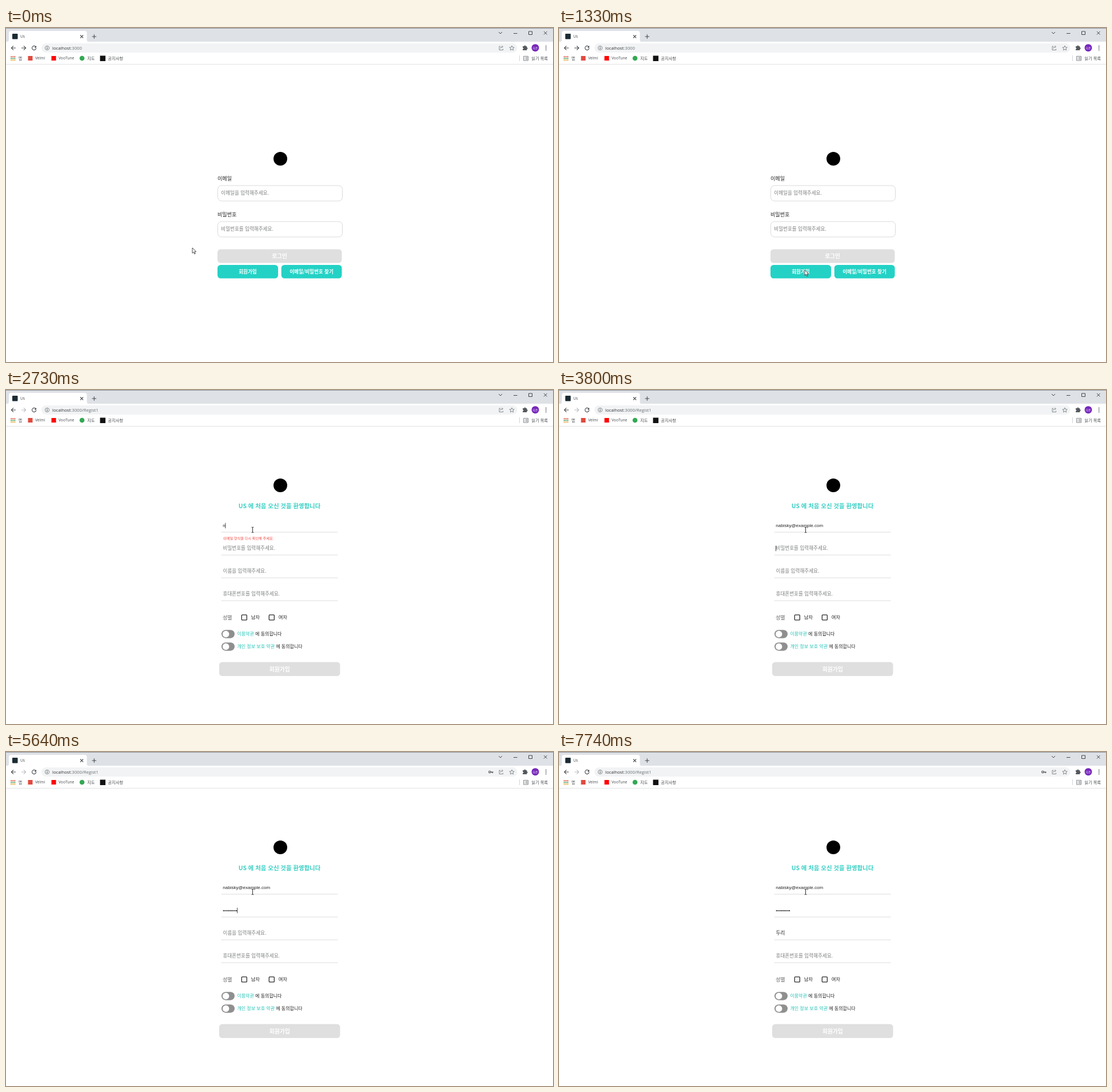
Animation of 957x585 px, one loop 8 s. Source, as an HTML page:

```html
<!DOCTYPE html>
<html lang="ko">
<head>
<meta charset="utf-8">
<title>Us</title>
<style>
  html, body { margin: 0; width: 100%; height: 100%; overflow: hidden; background: #fff; }
  svg { display: block; width: 100vw; height: 100vh; }
  text { font-family: "Noto Sans CJK KR", "Noto Sans CJK", "Noto Sans KR", sans-serif; font-size: 8.57px; fill: #222; white-space: pre; }
  .bar text { font-size: 7.25px; fill: #45494d; }
  .bar .en { font-family: "Open Sans", sans-serif; font-size: 6.7px; }
  .bar .url { font-family: "Open Sans", sans-serif; font-size: 7.7px; fill: #6b7075; }
  .bar .me { font-size: 4.8px; fill: #fff; text-anchor: middle; }
  .line { fill: none; stroke: #45494d; stroke-width: 1.1; }
  .thin { fill: none; stroke: #303336; stroke-width: .9; }
  .soft { fill: none; stroke: #6b7075; stroke-width: .8; }
  .hint { fill: #7b7f7d; }
  .latin { font-family: "Liberation Sans", Arial, sans-serif; font-size: 8px; }
  .label { font-size: 9.1px; }
  .btn { font-weight: 700; fill: #fff; text-anchor: middle; }
  .box { fill: #fff; stroke: #dadada; }
  .off { fill: #dfdfdf; }
  .teal { fill: #23d2c5; }
  .rule { stroke: #dcdcdc; }
  .check { fill: #fff; stroke: #2a2a2a; stroke-width: 1.3; }
  .terms { font-size: 8px; }
  .terms tspan { fill: #27c4b8; }
  .warn { font-size: 6.2px; fill: #f0433a; }
</style>
</head>
<body>
<svg viewBox="0 0 957 585" preserveAspectRatio="none">
  <g class="bar">
    <rect width="957" height="24" fill="#dee1e6"/>
    <rect width="957" height=".8" fill="#7d848e"/>
    <path d="M1 24.500q4 0 4-4V9q0-4 4-4H137.500q4 0 4 4v11.500q0 4 4 4z" fill="#fff"/>
    <rect x="11" y="10" width="9.500" height="9.500" rx="1" fill="#1b2b33"/>
    <text class="en" x="25" y="17.300">Us</text>
    <path class="line" d="M130 12.500l5 5m0-5l-5 5M150.500 15h7.500M154.250 11.250v7.500"/>
    <path class="thin" d="M862 7l3 3 3-3M888 9.500h6.500M914.500 6h6v5.500h-6zM941 6l5.500 5.500m0-5.500l-5.500 5.500"/>

    <rect x="62" y="27" width="832.500" height="16" rx="8" fill="#f1f3f4"/>
    <path class="line" d="M17 35H9.500M13 31.300L9.300 35l3.700 3.700"/>
    <path class="line" id="fwd" d="M27 35h7.500M31 31.300l3.700 3.700-3.700 3.700"/>
    <path class="line" d="M52 32.800a3.600 3.600 0 1 0 .7 2.600"/>
    <path d="M53 31v3.400h-3.400z" fill="#45494d"/>
    <circle class="soft" cx="72" cy="35" r="3.600"/>
    <path class="line" d="M72 34.500v2.600M72 32.800v.9"/>
    <text class="url" x="81" y="37.700"><tspan fill="#303336">localhost</tspan>:3000<tspan id="path"></tspan></text>
    <g id="key"><circle class="line" cx="846.300" cy="35" r="1.700"/><path class="line" d="M848 35h4.500M851.500 35v1.900M849.800 35v1.500"/></g>
    <path class="soft" d="M865 32h-2v6.500h6.500v-2M865 36q0-3.300 3.500-3.300M867.500 31l2 1.800-2 1.800"/>
    <path class="soft" d="M885 31l1.200 2.800 3 .2-2.300 2 .7 2.900-2.600-1.600-2.600 1.600.7-2.900-2.300-2 3-.2z"/>
    <path d="M904 32h2.500a1.400 1.400 0 0 1 2.800 0h2v2.300a1.400 1.400 0 0 1 0 2.800V39H904v-2a1.300 1.300 0 0 0 0-2.600z" fill="#55595d"/>
    <circle cx="926" cy="34.700" r="6.500" fill="#7627bb"/>
    <text class="me" x="926" y="36.500">다온</text>
    <g fill="#45494d"><circle cx="944.700" cy="31.700" r=".9"/><circle cx="944.700" cy="35" r=".9"/><circle cx="944.700" cy="38.300" r=".9"/></g>

    <g fill="none" stroke-width="2" stroke-dasharray="2 1">
      <path d="M8.300 50.200h8" stroke="#e2574c"/><path d="M8.300 53.200h8" stroke="#4c9a5b"/><path d="M8.300 56.200h8" stroke="#e5a83a"/>
    </g>
    <text x="21.500" y="55.500">앱</text>
    <rect x="38.500" y="49" width="8" height="8" fill="#e04a3f"/>
    <text class="en" x="51" y="55.300">Velmi</text>
    <rect x="79.500" y="49" width="8" height="8" fill="#f00"/>
    <text class="en" x="92" y="55.300">VooTune</text>
    <circle cx="133" cy="53" r="4.300" fill="#34a853"/>
    <text x="142" y="55.500">지도</text>
    <rect x="164.500" y="48.500" width="9.500" height="9.500" fill="#111"/>
    <text x="178.300" y="55.500">공지사항</text>
    <path d="M898.500 48v10" stroke="#d0d3d7"/>
    <path class="soft" d="M905.500 49.500h8v7.500h-8zM907 51.500h1m1 0h3.500M907 53.300h1m1 0h3.500M907 55.100h1m1 0h3.500"/>
    <text x="919.300" y="55.500">읽기 목록</text>
    <path d="M0 63.500h957" stroke="#dfe1e4"/>
  </g>

  <g id="login">
    <circle cx="480" cy="229" r="12"/>
    <text class="label" x="370" y="267.300">이메일</text>
    <rect class="box" x="370.500" y="276" width="218" height="27" rx="6.500"/>
    <text class="hint" x="376.300" y="292.300">이메일을 입력해주세요.</text>
    <text class="label" x="370" y="330.300">비밀번호</text>
    <rect class="box" x="370.500" y="339" width="218" height="27" rx="6.500"/>
    <text class="hint" x="376.300" y="355.300">비밀번호를 입력해주세요.</text>
    <rect class="off" x="370" y="387.500" width="217.500" height="24" rx="5.500"/>
    <text class="btn" x="478.500" y="403" style="font-size:9.7px">로그인</text>
    <rect class="teal" x="370" y="415" width="106" height="23.500" rx="5.500"/>
    <text class="btn" x="423" y="430">회원가입</text>
    <rect class="teal" x="481.700" y="415" width="105.800" height="23.500" rx="5.500"/>
    <text class="btn" x="534.500" y="430">이메일/비밀번호 찾기</text>
  </g>

  <g id="join">
    <circle cx="480" cy="167" r="12"/>
    <text class="btn" x="478.500" y="206.500" style="font-size:10.4px;fill:#35cfc4">US 에 처음 오신 것을 환영합니다</text>
    <path class="rule" d="M376.500 249h204M376.500 289h204M376.500 329h204M376.500 369h204"/>
    <text class="hint" x="379.600" y="240.300">이메일을 입력해주세요.</text>
    <text class="hint" x="379.600" y="280.300">비밀번호를 입력해주세요.</text>
    <text class="hint" x="379.600" y="320.300">이름을 입력해주세요.</text>
    <text class="hint" x="379.600" y="360.300">휴대폰번호를 입력해주세요.</text>
    <text class="typed latin" x="379.300" y="240.300"></text>
    <text class="typed latin" x="379.300" y="280.300"></text>
    <text class="typed" x="379.600" y="320.300"></text>
    <text class="typed" x="379.600" y="360.300"></text>
    <text class="warn" x="380" y="262">이메일 형식을 다시 확인해 주세요.</text>
    <text class="warn" x="380" y="302">숫자+영문자+특수문자 조합으로 8자리 이상 입력해주세요!</text>
    <text class="warn" x="380" y="342">2글자 이상 5글자 이하로 입력해주세요.</text>
    <rect id="caret" width=".9" height="9.600" fill="#333"/>
    <text class="label" x="379" y="401.500" style="fill:#666">성별</text>
    <rect class="check" x="412.300" y="393.900" width="9" height="9" rx="1"/>
    <text x="428.700" y="401.200" style="font-size:8.3px">남자</text>
    <rect class="check" x="460.300" y="393.900" width="9" height="9" rx="1"/>
    <text x="476.700" y="401.200" style="font-size:8.3px">여자</text>
    <g id="toggle">
      <rect x="377" y="420.200" width="23" height="14.500" rx="7.250" fill="#8f8f8f"/>
      <circle cx="384.700" cy="427.450" r="5.700" fill="#fff"/>
    </g>
    <use href="#toggle" y="22"/>
    <text class="terms" x="404.400" y="430.200"><tspan>이용약관</tspan> 에 동의합니다</text>
    <text class="terms" x="404.400" y="452"><tspan>개인 정보 보호 약관</tspan> 에 동의합니다</text>
    <rect class="off" x="373" y="476.500" width="211.500" height="24.500" rx="5.500"/>
    <text class="btn" x="478.700" y="492.500" style="font-size:9.8px">회원가입</text>
  </g>

  <g id="pointer">
    <path id="arrow" d="M0 0v9.400l2.200-2 1.600 3.500 1.500-.7-1.600-3.400h3z" fill="#fff" stroke="#222" stroke-width=".8"/>
    <path id="beam" d="M-2-4.700h1.500q.5 0 .5.500v8.400q0 .5-.5.500H-2M2-4.700H.5Q0-4.700 0-4.200v8.400q0 .5.500.5H2" fill="none" stroke="#222" stroke-width=".8"/>
  </g>
</svg>
<script>
  const LOOP = 8000, SWITCH = 1400, FOCUS = 1930;
  const $ = id => document.getElementById(id);
  const all = sel => [...document.querySelectorAll(sel)];
  const show = (el, on) => el.setAttribute('visibility', on ? 'inherit' : 'hidden');

  // time, x, y
  const path = [
    [30, 326, 385], [500, 381, 513], [830, 428, 434], [1060, 430, 424],
    [1360, 430, 424], [1730, 432.3, 259], [1930, 431.5, 245]
  ];

  // time, value
  const dots = [4170, 4330, 4470, 4670, 4870, 5040, 5100, 5300, 5640];
  const typing = [
    [[2730, 'n'], [2830, 'na'], [2930, 'nab'], [3300, 'nabisky@example.com']],
    dots.map((t, i) => [t, '•'.repeat(i + 1)]),
    [[6600, 'ㄷ'], [6660, '두'], [6840, '둘'], [6940, '두리']],
    []
  ];
  const warnings = [[2730, 3300], [4170, 5640], [6600, 6940]];

  // caret: on, off, field
  const carets = [
    [FOCUS, 2500, 0], [2730, 3630, 0], [3630, 5940, 1],
    [5940, 6440, 2], [6600, 7170, 2], [7170, 7640, 3]
  ];

  const typed = all('.typed'), hints = all('#join .hint'), warns = all('.warn');

  function pointerAt(t) {
    const i = path.findIndex(p => p[0] > t);
    if (i === 0) return path[0].slice(1);
    if (i < 0) return path[path.length - 1].slice(1);
    const [t0, x0, y0] = path[i - 1], [t1, x1, y1] = path[i];
    const u = (t - t0) / (t1 - t0), k = u * u * (3 - 2 * u);
    return [x0 + (x1 - x0) * k, y0 + (y1 - y0) * k];
  }

  function valueAt(steps, t) {
    return steps.reduce((v, [at, s]) => t >= at ? s : v, '');
  }

  function draw(t) {
    const joined = t >= SWITCH;
    show($('login'), !joined);
    show($('join'), joined);
    show($('key'), t >= dots[0]);
    $('path').textContent = joined ? '/Regist1' : '';
    $('fwd').style.stroke = joined ? '#b9bcc0' : '';

    typing.forEach((steps, i) => {
      const s = valueAt(steps, t);
      if (typed[i].textContent !== s) typed[i].textContent = s;
      show(hints[i], !s);
    });
    warnings.forEach(([from, to], i) => show(warns[i], t >= from && t < to));

    const c = carets.find(([on, off]) => t >= on && t < off);
    show($('caret'), !!c);
    if (c) {
      const el = typed[c[2]];
      const w = el.textContent ? el.getComputedTextLength() : 0;
      $('caret').setAttribute('x', 379 + w);
      $('caret').setAttribute('y', 232.7 + 40 * c[2]);
    }

    const [x, y] = pointerAt(t), overField = joined && y < 249;
    $('pointer').setAttribute('transform', `translate(${x} ${y})`);
    show($('arrow'), !overField);
    show($('beam'), overField);
  }

  const start = performance.now();
  function tick() {
    draw((performance.now() - start) % LOOP);
    requestAnimationFrame(tick);
  }
  tick();
</script>
</body>
</html>
```
